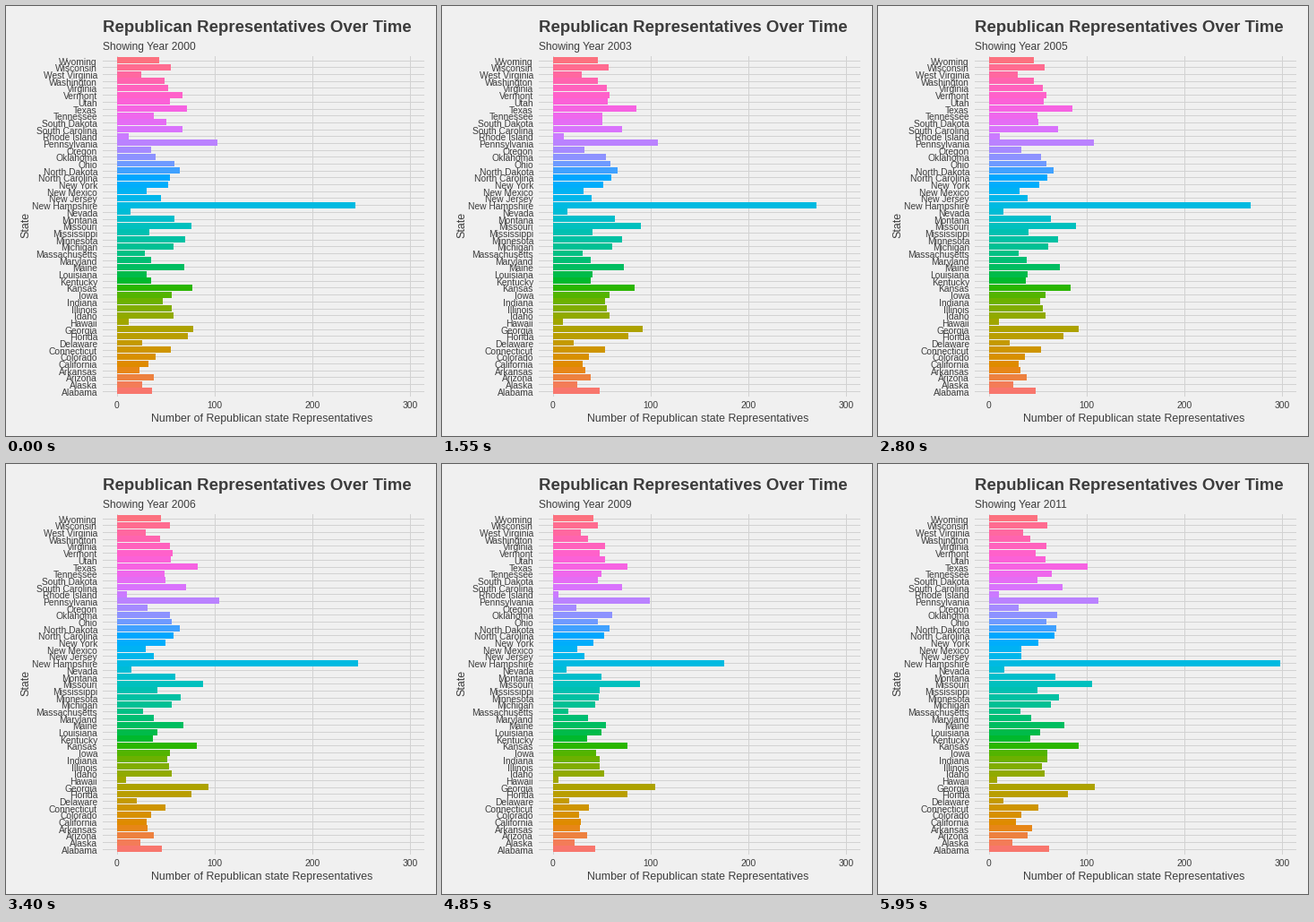
Animation of 480x480 px, one loop 6 s. Source, as a matplotlib script:

```python
import numpy as np
import matplotlib.pyplot as plt
from matplotlib.animation import FuncAnimation
from matplotlib.patches import Rectangle

SIZE, DPI = 480, 100
FRAMES, STEP = 120, 50
FIRST, LAST = 2000, 2011
BACK, GRID, INK = "#F0F0F0", "#D2D2D2", "#3C3C3C"
LEFT, RIGHT, TOP, BOTTOM = 107.5, 466, 56, 434.5
X0, UNIT = 123.8, 1.0905          # pixel of zero, pixels per seat
ROW0, PITCH = 429.8, 7.69         # centre of the lowest row, row spacing

# Key points per state: seats at the start, at the low and at the end
STATES = {
    "Alabama": (36, 43, 62), "Alaska": (26, 22, 24), "Arizona": (38, 35, 40),
    "Arkansas": (23, 28, 44), "California": (32, 29, 28),
    "Colorado": (40, 27, 33), "Connecticut": (55, 37, 51),
    "Delaware": (26, 17, 15), "Florida": (73, 76, 81),
    "Georgia": (78, 105, 108), "Hawaii": (12, 6, 8), "Idaho": (58, 52, 57),
    "Illinois": (56, 48, 54), "Indiana": (47, 48, 60), "Iowa": (56, 44, 60),
    "Kansas": (77, 76, 92), "Kentucky": (35, 35, 42),
    "Louisiana": (30, 50, 52), "Maine": (69, 54, 77), "Maryland": (35, 36, 43),
    "Massachusetts": (29, 16, 32), "Michigan": (58, 43, 63),
    "Minnesota": (70, 47, 72), "Mississippi": (33, 48, 50),
    "Missouri": (76, 89, 106), "Montana": (59, 50, 68), "Nevada": (14, 14, 16),
    "New Hampshire": (244, 175, 298), "New Jersey": (45, 32, 33),
    "New Mexico": (30, 25, 33), "New York": (52, 41, 51),
    "North Carolina": (54, 52, 67), "North Dakota": (64, 58, 69),
    "Ohio": (59, 46, 59), "Oklahoma": (40, 61, 70), "Oregon": (35, 24, 30),
    "Pennsylvania": (103, 99, 112), "Rhode Island": (12, 6, 10),
    "South Carolina": (67, 71, 75), "South Dakota": (51, 46, 50),
    "Tennessee": (38, 50, 64), "Texas": (72, 76, 101), "Utah": (54, 53, 58),
    "Vermont": (67, 48, 48), "Virginia": (52, 53, 59),
    "Washington": (49, 36, 42), "West Virginia": (25, 29, 35),
    "Wisconsin": (55, 46, 60), "Wyoming": (43, 41, 50),
}

# Pull towards the low and the end after each election
TO_LOW = [0, 0, 0, 0, 0.8, 1, 0]
TO_END = [0, 0.2, 0.5, 0.45, 0, 0, 1]
SPAN = LAST - FIRST
KEYS = np.round((FRAMES - 1) * np.arange(SPAN + 1) / SPAN)
TERM = (np.arange(SPAN + 1) + 1) // 2      # seats change in odd years only


def pull(shares, i):
    return np.interp(i, KEYS, np.take(shares, TERM))


def hcl(hue, c=100, l=65):
    """Polar LUV colour as clipped sRGB."""
    h = np.radians(hue)
    y = ((l + 16) / 116) ** 3
    u = c * np.cos(h) / (13 * l) + 0.1978398
    v = c * np.sin(h) / (13 * l) + 0.4683363
    x = 9 * y * u / (4 * v)
    z = -x / 3 - 5 * y + 3 * y / v
    rgb = np.array([3.240479 * x - 1.537150 * y - 0.498535 * z,
                    -0.969256 * x + 1.875992 * y + 0.041556 * z,
                    0.055648 * x - 0.204043 * y + 1.057311 * z]).clip(0, 1)
    return np.where(rgb > 0.00304, 1.055 * rgb ** (1 / 2.4) - 0.055, 12.92 * rgb)


plt.rcParams["font.family"] = "Liberation Sans"
fig = plt.figure(figsize=(SIZE / DPI, SIZE / DPI), dpi=DPI, facecolor=BACK)
ax = fig.add_axes([0, 0, 1, 1])
ax.set(xlim=(0, SIZE), ylim=(SIZE, 0))
ax.axis("off")


def pt(px):
    return px * 72 / DPI


def label(x, y, text, px, ha="left", **kw):
    return ax.text(x, y, text, size=pt(px), ha=ha, color=INK,
                   **{"va": "baseline", **kw})


def rule(xs, ys):
    ax.plot(xs, ys, color=GRID, lw=pt(1), antialiased=False,
            solid_capstyle="butt", zorder=1)


label(108, 29, "Republican Representatives Over Time", 18.6, weight="bold")
subtitle = label(108, 49, "", 12)
label(285.5, 464, "Number of Republican state Representatives", 12.4, "center")
label(22.5, 244.5, "State", 12.4, "center", va="center", rotation=90)

for n in range(0, 301, 100):
    x = X0 + n * UNIT
    rule([x, x], [TOP, BOTTOM])
    label(x, 449, str(n), 10.2, "center")

bars = []
for k, name in enumerate(STATES):
    y = ROW0 - k * PITCH
    rule([LEFT, RIGHT], [y, y])
    label(102, round(y + 5), name, 10.3, "right")
    bar = Rectangle((X0, y - 0.45 * PITCH), 0, 0.9 * PITCH, lw=0, zorder=2,
                    color=hcl(15 + 360 * k / len(STATES)), snap=True)
    bars.append(ax.add_patch(bar))


def draw(i):
    subtitle.set_text(f"Showing Year {FIRST + round(SPAN * i / (FRAMES - 1))}")
    a, b = pull(TO_LOW, i), pull(TO_END, i)
    for bar, (start, low, end) in zip(bars, STATES.values()):
        bar.set_width(UNIT * (start + a * (low - start) + b * (end - start)))
    return [subtitle, *bars]


anim = FuncAnimation(fig, draw, frames=FRAMES, interval=STEP, repeat=True,
                     repeat_delay=0, blit=False)
plt.show()
```
